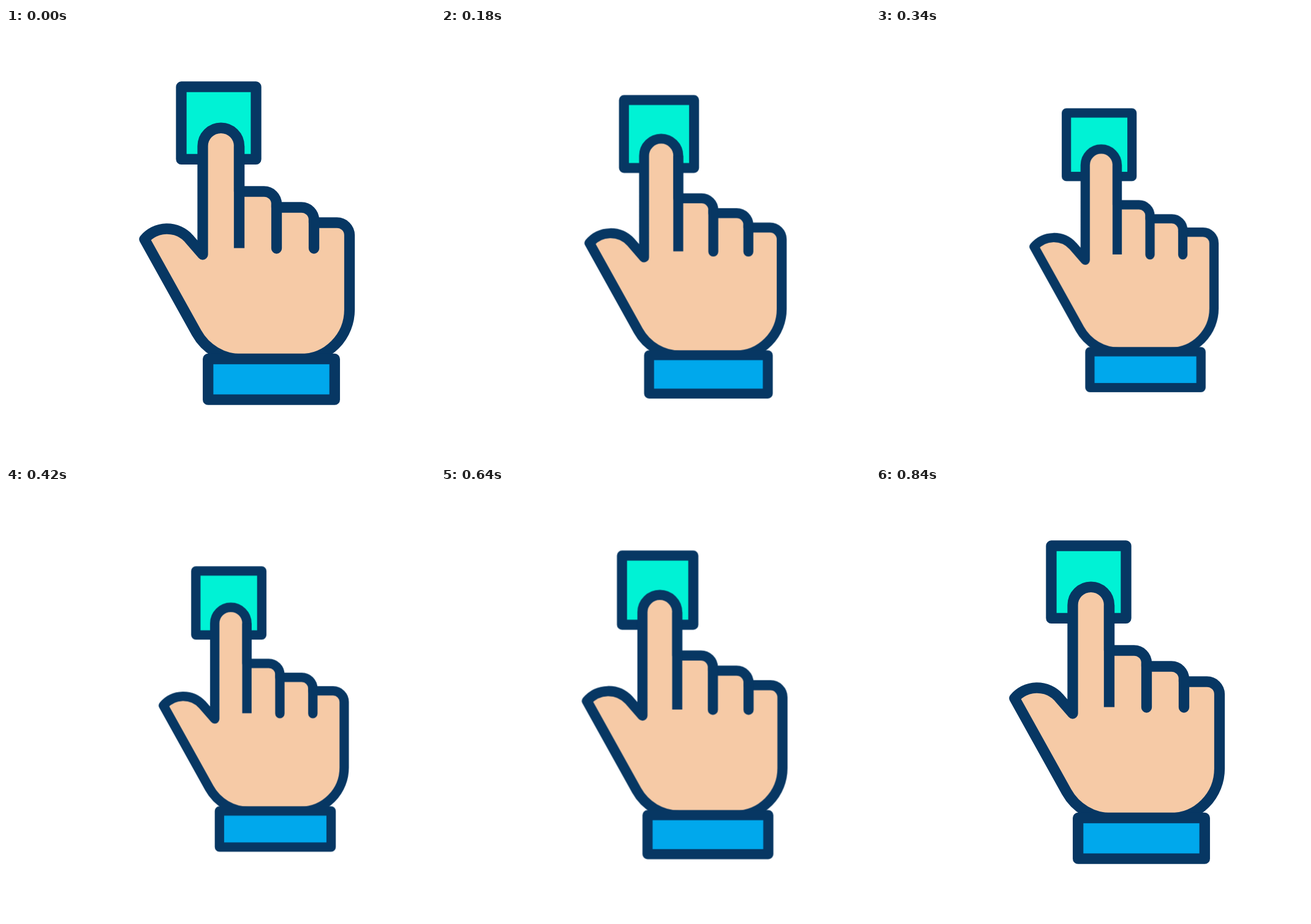
Animation of 700 by 704 pixels, one loop 2980 ms. Source, as an HTML page:

```html
<!DOCTYPE html>
<html lang="en">
<head>
<meta charset="utf-8">
<title>Finger press</title>
<style>
  html, body { margin: 0; width: 100%; height: 100%; overflow: hidden; background: #fff; }
  svg { display: block; width: 100%; height: 100%; }
  .press {
    stroke: #073763;
    stroke-width: 17.3;
    stroke-linejoin: round;
    transform-origin: 487px 445px;
    animation: press 2980ms infinite;
  }
  .button { fill: #00f2d5; }
  .skin { fill: #f6caa6; }
  .cuff { fill: #00a8ec; }
  .crease { fill: none; }
  .round { stroke-linecap: round; }
  /* 360 ms down, 480 ms back, then rest */
  @keyframes press {
    0% { transform: scale(1); animation-timing-function: cubic-bezier(.3333, 0, .6667, 1); }
    12.0805% { transform: scale(.8765); animation-timing-function: cubic-bezier(.3333, 0, .6667, 1); }
    28.1879%, 100% { transform: scale(1); }
  }
</style>
</head>
<body>
<svg viewBox="0 0 700 704">
  <g class="press">
    <rect class="button" x="286" y="96" width="122" height="118.3"/>
    <path class="skin" d="M380.5 193 A29.75 29.75 0 0 0 321 193 V370 L298 343.5
      A48 48 0 0 0 226 345 L311 498 A83.7 83.7 0 0 0 384 541 H480
      A80.5 81 0 0 0 560.5 460 V338.5 A20.5 20.5 0 0 0 540 318 H502.5
      V313.5 A20.5 20.5 0 0 0 482 293 H441.5
      V287.5 A20.5 20.5 0 0 0 421 267 H380.5 Z"/>
    <path class="crease" d="M380.5 193 V359.5"/>
    <path class="crease round" d="M441.5 288 V360 M502.5 314 V360"/>
    <rect class="cuff" x="329.7" y="540.5" width="206.6" height="66.7"/>
  </g>
</svg>
</body>
</html>
```
